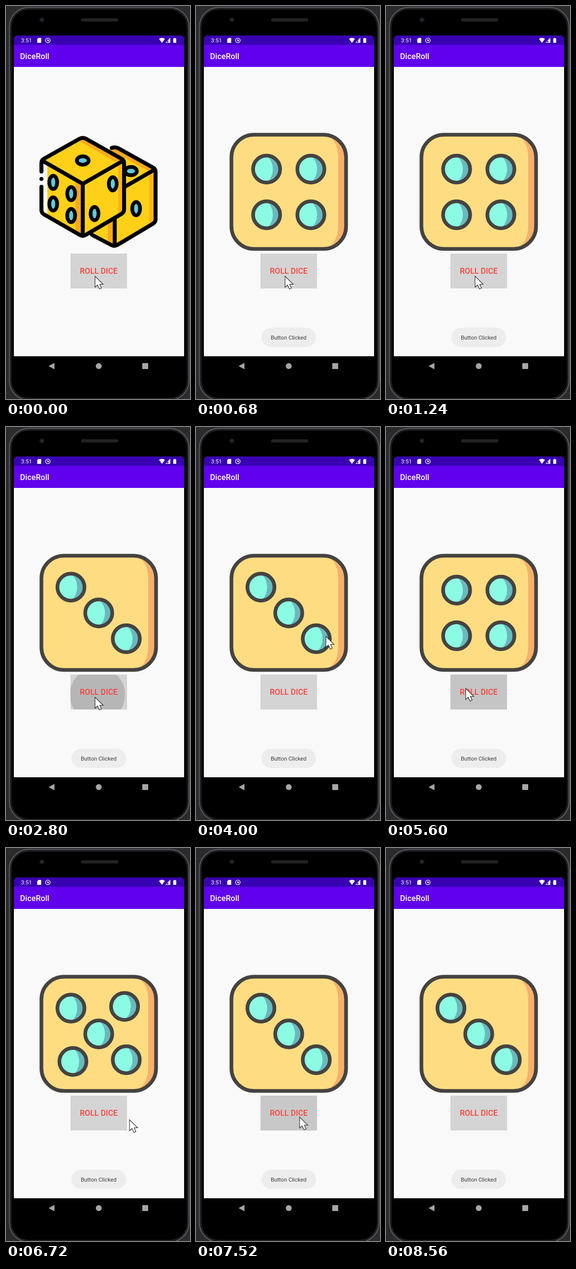
Write an HTML page that moves like this. It is 374 by 800 pixels and loops after 8600 ms.

```html
<!DOCTYPE html>
<html lang="en">
<head>
<meta charset="utf-8">
<title>DiceRoll</title>
<style>
  html, body { margin: 0; width: 100%; height: 100%; overflow: hidden; background: #000; }
  svg { display: block; width: 374px; height: 800px; }
  text { font-family: Roboto, sans-serif; }

  .swap { animation: 8600ms step-end infinite; }
  #intro { animation-name: intro; }
  #die { animation-name: die; }
  #diagonal { animation-name: diagonal; }
  #corners { animation-name: corners; }
  #extra { animation-name: extra; }
  #toast { animation: toast 8600ms linear infinite; }
  #cursor { animation: cursor 8600ms ease-in-out infinite; }

  .ripple {
    opacity: 0;
    transform-origin: 188px 540px;
    animation: ripple 8600ms linear var(--at) infinite;
  }

  @keyframes intro { 0% { opacity: 1 } 2.8%, 100% { opacity: 0 } }
  @keyframes die { 0% { opacity: 0 } 2.8%, 100% { opacity: 1 } }
  @keyframes diagonal {
    0% { opacity: 0 } 22.3% { opacity: 1 } 62.3% { opacity: 0 } 73.5%, 100% { opacity: 1 }
  }
  @keyframes corners {
    0% { opacity: 0 } 2.8% { opacity: 1 } 22.3% { opacity: 0 }
    62.3% { opacity: 1 } 73.5%, 100% { opacity: 0 }
  }
  @keyframes extra { 0% { opacity: 0 } 73.5% { opacity: 1 } 84.2%, 100% { opacity: 0 } }
  @keyframes toast { 0%, 4.2% { opacity: 0 } 7%, 100% { opacity: 1 } }
  @keyframes ripple {
    0% { opacity: 0; transform: translate(var(--x), var(--y)) scale(.3) }
    .8% { opacity: 1 }
    1.4% { transform: translate(calc(var(--x) * .3), calc(var(--y) * .45)) scale(.8) }
    2.3% { opacity: 1 }
    2.6% { transform: none }
    6%, 100% { opacity: 0; transform: none }
  }
  @keyframes cursor {
    0%, 41.4% { transform: translate(181px, 550px) }
    46%, 54% { transform: translate(264px, 426px) }
    59.5%, 74.4% { transform: translate(162px, 532px) }
    76.7%, 79.5% { transform: translate(251px, 553px) }
    81.9%, 86.5% { transform: translate(175px, 545px) }
    89.8%, 100% { transform: translate(380px, 560px) }
  }
</style>
</head>
<body>
<svg viewBox="0 0 374 800">
  <defs>
    <clipPath id="screen"><path d="M16 713V70Q16 60 26 60H352Q362 60 362 70V713Z"/></clipPath>
    <clipPath id="button"><rect x="131" y="504" width="115" height="71"/></clipPath>
    <g id="dot">
      <circle r="27.5" fill="#8cfbe4"/>
      <path d="M0-27.5A36 36 0 0 1 0 27.5A27.5 27.5 0 0 0 0-27.5Z" fill="#6ab9bd"/>
      <circle r="27.5" fill="none" stroke="#454340" stroke-width="7.5"/>
    </g>
    <ellipse id="pip" rx="8" ry="13.5" fill="#5cccdc" stroke="#000" stroke-width="7.5"/>
    <ellipse id="flat-pip" rx="12" ry="8.5" fill="#5cccdc" stroke="#000" stroke-width="7.5"/>
  </defs>

  <!-- Phone -->
  <rect width="374" height="800" fill="#2b2b2d"/>
  <rect x="7" y="3" width="365" height="799" rx="39" fill="#000" stroke="#54555b" stroke-width="2.5"/>
  <rect x="10" y="6" width="359" height="793" rx="36" fill="none" stroke="#222226" stroke-width="2.5"/>
  <circle cx="73" cy="28" r="5" fill="#18191e"/>
  <circle cx="73" cy="28" r="2" fill="#30343e"/>
  <rect x="153" y="25" width="75" height="6.5" rx="2" fill="#232325"/>

  <!-- Screen -->
  <g clip-path="url(#screen)">
    <rect x="16" y="60" width="346" height="653" fill="#f9f9fa"/>
    <rect x="16" y="60" width="346" height="64" fill="#6000ec"/>
    <rect x="16" y="60" width="346" height="19" fill="#3902b1"/>
  </g>
  <g fill="#fff">
    <text x="30.5" y="74" font-size="11.5">3:51</text>
    <path d="M66 65H71.5V75H63.5V67.5Z"/>
    <circle cx="85" cy="70" r="4.7" fill="none" stroke="#fff" stroke-width="1.3"/>
    <path d="M82.5 68.5H87V72.5L84.5 70.5Z"/>
    <path d="M311 67Q317 62.5 323 67L317 75Z"/>
    <path d="M333.5 65.5V74.5H325Z" fill="none" stroke="#fff"/>
    <path d="M330 69L333.5 65.5V74.5H330Z"/>
    <path d="M340 66H341.8V65H344.2V66H346V75H340Z"/>
    <text x="28.5" y="107.5" font-size="16.2" font-weight="500">DiceRoll</text>
  </g>
  <g fill="#a6a6a6">
    <path d="M86.5 733L98.5 726.5V739.5Z"/>
    <circle cx="188.5" cy="733" r="6"/>
    <rect x="277" y="727" width="12" height="12" rx="1"/>
  </g>

  <!-- Pair of dice -->
  <g id="intro" class="swap" stroke-linejoin="round" stroke-linecap="round">
    <path d="M215 289Q222 286 229 290L299 329Q304 332 304 338V434Q304 440 299 443L227 486Q221 490 215 487L172 465L180 310Z" fill="#ffd018"/>
    <path d="M229 290L299 329L290 336L214 294Z" fill="#f8a820"/>
    <path d="M291 341L304 334V436L291 446Z" fill="#ffb414"/>
    <path d="M207 440L221 432V487L207 482Z" fill="#f8a820"/>
    <path d="M215 289Q222 286 229 290L299 329Q304 332 304 338V434Q304 440 299 443L227 486Q221 490 215 487L175 466M221 425V487M238 370L302 333" fill="none" stroke="#000" stroke-width="8"/>
    <use href="#flat-pip" x="254" y="336"/>
    <use href="#pip" x="264.5" y="412.5"/>

    <path d="M150 270Q156 267 162 270L235 311Q240 314 240 320V414Q240 420 235 423L162 466Q156 470 150 466L77 424Q72 421 72 415V320Q72 314 77 311Z" fill="#ffd018"/>
    <path d="M68 318H74L84 324V428L74 421H68Z" fill="#f9f9fa"/>
    <path d="M162 270L235 311L224 318L146 273Z" fill="#f8a820"/>
    <path d="M141 354L156 362V467L141 460Z" fill="#f8a820"/>
    <path d="M228 322L240 315V420L228 427Z" fill="#ffb414"/>
    <path d="M72 337V320Q72 314 77 311L150 270Q156 267 162 270L235 311Q240 314 240 320V414Q240 420 235 423L162 466Q156 470 150 466L77 424Q72 421 72 415V368M74 315L156 362L238 315M156 362V467M72 352V352.1" fill="none" stroke="#000" stroke-width="8"/>
    <use href="#flat-pip" x="156" y="314.5"/>
    <use href="#pip" x="96" y="359"/>
    <use href="#pip" x="96" y="403"/>
    <use href="#pip" x="132.5" y="382"/>
    <use href="#pip" x="132.5" y="426.5"/>
    <use href="#pip" x="217" y="362"/>
    <use href="#pip" x="180" y="422.5"/>
  </g>

  <!-- Rolled die -->
  <g id="die" class="swap">
    <rect x="72" y="262" width="233" height="232.5" rx="46" fill="#f6b06c"/>
    <path d="M118 262H256Q289 266 289 310V446Q289 490 256 494.5H118A46 46 0 0 1 72 448.5V308A46 46 0 0 1 118 262Z" fill="#fedd82"/>
    <rect x="72" y="262" width="233" height="232.5" rx="46" fill="none" stroke="#454340" stroke-width="7.5"/>
    <g id="corners" class="swap">
      <use href="#dot" x="143.5" y="332"/>
      <use href="#dot" x="233.5" y="332"/>
      <use href="#dot" x="143.5" y="425"/>
      <use href="#dot" x="233.5" y="425"/>
    </g>
    <g id="diagonal" class="swap">
      <use href="#dot" x="132" y="326"/>
      <use href="#dot" x="188.5" y="378.5"/>
      <use href="#dot" x="244.5" y="431"/>
    </g>
    <g id="extra" class="swap">
      <use href="#dot" x="241" y="322.5"/>
      <use href="#dot" x="136" y="434.5"/>
    </g>
  </g>

  <!-- Button -->
  <rect x="131" y="504" width="115" height="71" fill="#d4d4d5"/>
  <g id="ripples" clip-path="url(#button)" fill="#98989a" fill-opacity=".5"></g>
  <text x="188.5" y="545" font-size="16" font-weight="500" text-anchor="middle" fill="#f8443c">ROLL DICE</text>

  <g id="toast">
    <rect x="133" y="655" width="111" height="39" rx="19.5" fill="#ededee"/>
    <text x="188.3" y="678.5" font-size="11.3" text-anchor="middle" fill="#3c3c3c">Button Clicked</text>
  </g>

  <path id="cursor" d="M0 0V22.5L5 18L9 26L13 24.3L9.5 16.5H16.5Z" fill="#fff" stroke="#222" stroke-width="1.1"/>
</svg>
<script>
  // Each press: start in ms, offset of the touch from the button centre.
  const presses = [
    [80, -7, 11], [1800, -7, 11], [2680, -7, 11],
    [5240, -26, -8], [6160, -26, -8], [7120, -13, 5]
  ];
  const layer = document.getElementById('ripples');
  for (const [at, x, y] of presses) {
    const dot = document.createElementNS(layer.namespaceURI, 'circle');
    dot.setAttribute('class', 'ripple');
    dot.setAttribute('cx', 188);
    dot.setAttribute('cy', 540);
    dot.setAttribute('r', 70);
    dot.style.cssText = `--at:${at}ms;--x:${x}px;--y:${y}px`;
    layer.append(dot);
  }
</script>
</body>
</html>
```
